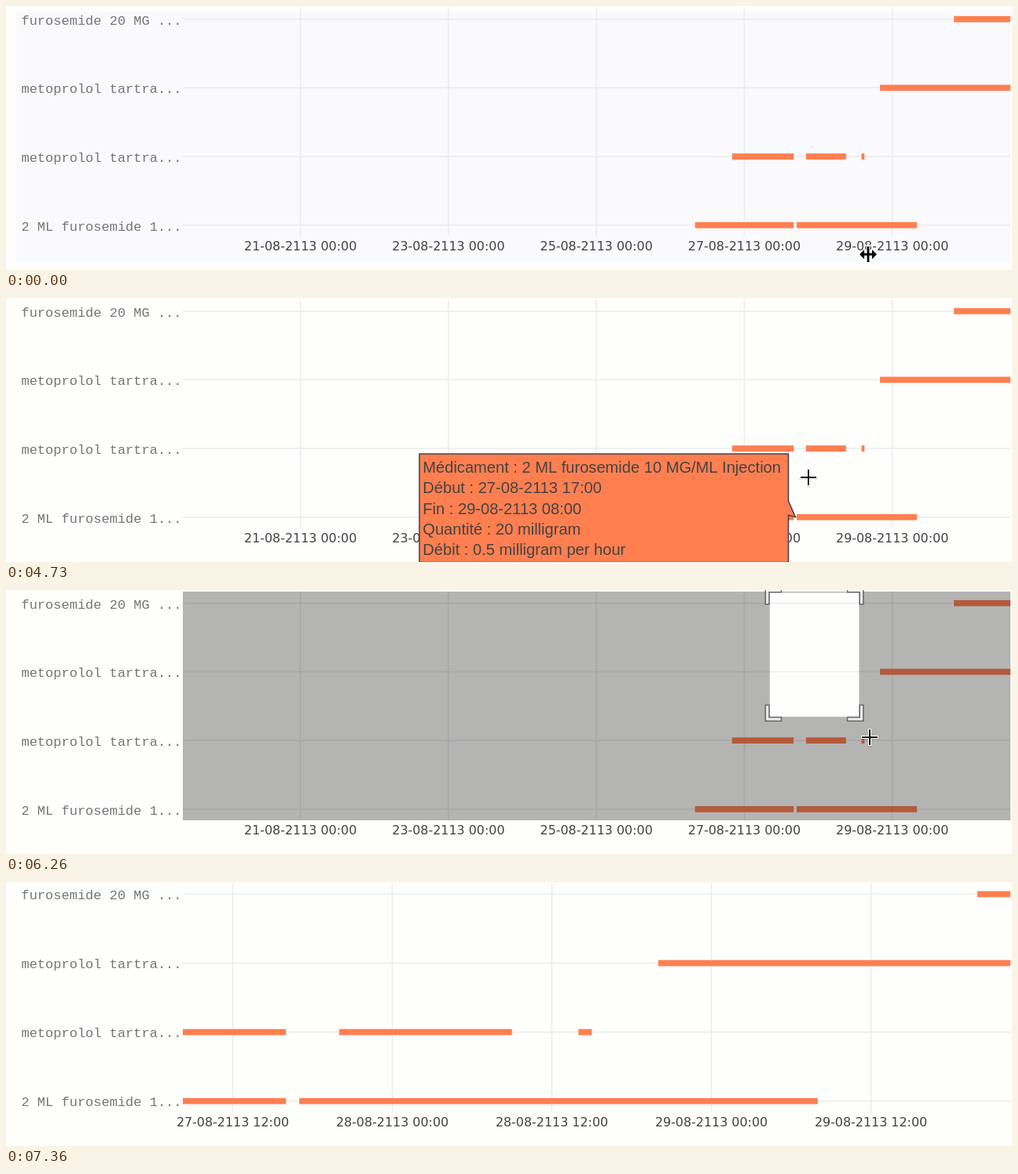
An HTML page with a canvas for the animation above (8 s loop, 1280 by 337 pixels).

```html
<!DOCTYPE html>
<html lang="fr">
<head>
<meta charset="utf-8">
<title>Médicaments</title>
<style>
html, body { margin: 0; width: 100%; height: 100%; overflow: hidden; background: #fefefd; }
canvas { display: block; }
</style>
</head>
<body>
<canvas id="stage" width="1280" height="337"></canvas>
<script>
const ctx = document.getElementById('stage').getContext('2d');
const LOOP = 8000, TIP_ON = 860, TIP_OFF = 4770, RELEASE = 7330;
const CORAL = '#ff7f50', INK = '#444', GRID = '#ececee';
const PX = 1.55;  // device pixels per chart pixel
const PLOT = { left: 225, top: 2, right: 1278, bottom: 294 };
const DAY0 = Date.UTC(2113, 7, 27);
const TICK_FONT = '15.9px "DejaVu Sans", Verdana, sans-serif';
const ROW_FONT = '17px "Liberation Mono", monospace';
const TIP_FONT = '20.1px "Liberation Sans", Arial, sans-serif';

// Bars are [start, end] in hours after DAY0.
const rows = [
  { label: 'furosemide 20 MG ...', bars: [[68, 200]] },
  { label: 'metoprolol tartra...', bars: [[44, 200]] },
  { label: 'metoprolol tartra...', bars: [[-4, 16], [20, 33], [38, 39]] },
  { label: '2 ML furosemide 1...', bars: [[-16, 16], [17, 56]] }
];

const wide = { zero: 939.4, hour: 3.9219, top: 16.8, gap: 87.65, firstTick: -144, step: 48 };
const zoomed = { zero: 85.5, hour: 16.9167, top: 15.5, gap: 88.05, firstTick: 12, step: 12 };

const tip = [
  'Médicament : 2 ML furosemide 10 MG/ML Injection',
  'Début : 27-08-2113 17:00',
  'Fin : 29-08-2113 08:00',
  'Quantité : 20 milligram',
  'Débit : 0.5 milligram per hour'
];

// Where the pointer rests or turns.
const stops = [
  { t: 0, x: 1097, y: 317 }, { t: 960, x: 1022, y: 283 }, { t: 4729, x: 1022, y: 283 },
  { t: 4730, x: 1021, y: 230 }, { t: 5500, x: 968, y: 7 }, { t: 6130, x: 971, y: 4 },
  { t: 6200, x: 1083, y: 157 }, { t: 6260, x: 1098, y: 187 },
  { t: 6560, x: 1177, y: 325 }, { t: 7160, x: 1216, y: 353 }
];

const clamp = (v, lo, hi) => Math.min(hi, Math.max(lo, v));
const easeOut = p => 1 - (1 - p) ** 2;
const easeInOut = p => p < 0.5 ? 4 * p ** 3 : 1 - 4 * (1 - p) ** 3;

function pointerAt(t) {
  const next = stops.findIndex(s => s.t > t);
  if (next < 0) return stops[stops.length - 1];
  const a = stops[next - 1], b = stops[next];
  const p = easeOut((t - a.t) / (b.t - a.t));
  return { x: a.x + (b.x - a.x) * p, y: a.y + (b.y - a.y) * p };
}

function rect(x1, y1, x2, y2, color) {
  ctx.fillStyle = color;
  ctx.fillRect(x1, y1, x2 - x1, y2 - y1);
}

function text(str, x, y, font, color, align) {
  ctx.font = font;
  ctx.fillStyle = color;
  ctx.textAlign = align;
  ctx.fillText(str, x, y);
}

function tickLabel(hours) {
  const [date, time] = new Date(DAY0 + hours * 3600000).toISOString().split('T');
  return date.split('-').reverse().join('-') + ' ' + time.slice(0, 5);
}

function drawChart(view) {
  const xAt = h => view.zero + h * view.hour;
  const edge = h => clamp(xAt(h), PLOT.left, PLOT.right);
  const yAt = i => view.top + i * view.gap;
  for (let i = 0; i < 5; i++) {
    const h = view.firstTick + i * view.step, x = xAt(h);
    rect(x - PX / 2, PLOT.top, x + PX / 2, PLOT.bottom, GRID);
    text(tickLabel(h), x, 312, TICK_FONT, INK, 'center');
  }
  rows.forEach((row, i) => {
    const y = yAt(i);
    rect(PLOT.left, y - PX / 2, PLOT.right, y + PX / 2, GRID);
    text(row.label, 223.5, y + 6.8, ROW_FONT, '#757575', 'right');
    for (const [a, b] of row.bars) rect(edge(a), y - 3.9, edge(b), y + 3.9, CORAL);
  });
}

function drawTip() {
  const left = 526, right = 995.5, top = 199, bottom = 337.5;
  const mid = (top + bottom) / 2;
  ctx.beginPath();
  ctx.moveTo(1004.5, 279.7);
  ctx.lineTo(right, mid - 9);
  ctx.lineTo(right, top);
  ctx.lineTo(left, top);
  ctx.lineTo(left, bottom);
  ctx.lineTo(right, bottom);
  ctx.lineTo(right, mid + 9);
  ctx.closePath();
  ctx.fillStyle = CORAL;
  ctx.fill();
  ctx.strokeStyle = INK;
  ctx.lineWidth = PX;
  ctx.stroke();
  tip.forEach((line, i) => text(line, 530.3, 223 + i * 26.3, TIP_FONT, INK, 'left'));
}

// L-shaped handle; sx and sy point away from the selection.
function corner(x, y, sx, sy, len) {
  const inner = PX / 2, outer = inner + 3 * PX, tail = inner - len;
  ctx.save();
  ctx.translate(x, y);
  ctx.scale(sx, sy);
  ctx.beginPath();
  ctx.moveTo(outer, tail);
  ctx.lineTo(inner, tail);
  ctx.lineTo(inner, inner);
  ctx.lineTo(tail, inner);
  ctx.lineTo(tail, outer);
  ctx.lineTo(outer, outer);
  ctx.closePath();
  ctx.fill();
  ctx.stroke();
  ctx.restore();
}

function drawSelection(t) {
  const shown = easeInOut(clamp((t - 6169) / 154, 0, 1));
  if (!shown) return;
  const hand = pointerAt(t - 56);  // the box trails the pointer
  const l = 971.75, top = 3.5;
  const r = Math.max(l, hand.x), b = clamp(hand.y, top, PLOT.bottom);
  ctx.beginPath();
  ctx.rect(PLOT.left, PLOT.top, PLOT.right - PLOT.left, PLOT.bottom - PLOT.top);
  ctx.rect(l, top, r - l, b - top);
  ctx.fillStyle = `rgba(0,0,0,${0.4 * shown})`;
  ctx.fill('evenodd');

  const len = Math.min(b - top, r - l, 20 * PX) / 2;
  ctx.globalAlpha = shown;
  ctx.fillStyle = '#fff';
  ctx.strokeStyle = INK;
  ctx.lineWidth = PX;
  for (const sx of [-1, 1]) {
    for (const sy of [-1, 1]) corner(sx < 0 ? l : r, sy < 0 ? top : b, sx, sy, len);
  }
  ctx.globalAlpha = 1;
}

function plus(w, h, color, width) {
  ctx.strokeStyle = color;
  ctx.lineWidth = width;
  ctx.beginPath();
  ctx.moveTo(-w, 0);
  ctx.lineTo(w, 0);
  ctx.moveTo(0, -h);
  ctx.lineTo(0, h);
  ctx.stroke();
}

function drawCross() {
  ctx.save();
  ctx.translate(0, 1);
  plus(12, 12, 'rgba(0,0,0,0.12)', 4);
  ctx.restore();
  plus(11, 11, '#fff', 4);
  plus(10, 10, '#111', 2);
}

function drawResize() {
  const heads = new Path2D('M-11 0L-5 -6V6ZM11 0L5 -6V6Z');
  ctx.lineJoin = 'round';
  plus(9, 12, '#fff', 5);
  ctx.lineWidth = 2.4;
  ctx.stroke(heads);
  plus(7, 10, '#000', 2.8);
  ctx.fillStyle = '#000';
  ctx.fill(heads);
}

function drawPointer(t) {
  const { x, y } = pointerAt(t);
  ctx.save();
  ctx.translate(Math.round(x), Math.round(y));
  if (t < TIP_ON && y > PLOT.bottom) drawResize();
  else drawCross();
  ctx.restore();
}

function draw(t) {
  rect(0, 0, 1280, 337, '#fefefd');
  if (t < 30) rect(13, 7, 1278, 327, '#fafafd');
  drawChart(t < RELEASE ? wide : zoomed);
  if (t >= TIP_ON && t < TIP_OFF) drawTip();
  if (t >= RELEASE) return;
  drawSelection(t);
  drawPointer(t);
}

const start = performance.now();
function tick() {
  draw((performance.now() - start) % LOOP);
  requestAnimationFrame(tick);
}
tick();
</script>
</body>
</html>
```
